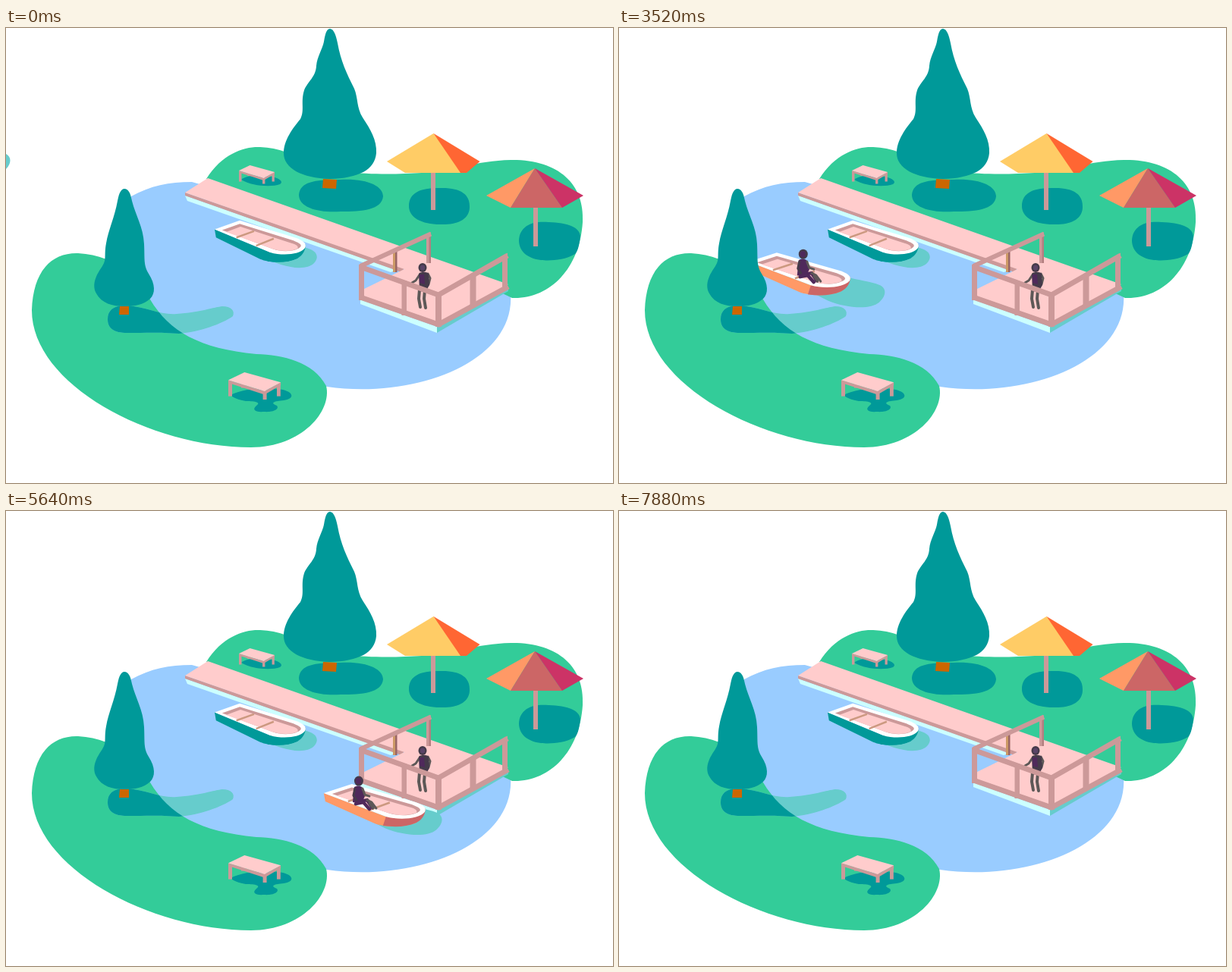
Recreate the animation shown at these times as an HTML page with a canvas. Size 800 by 600 pixels, loop 8 s.

```html
<!DOCTYPE html>
<html lang="en">
<head>
<meta charset="utf-8">
<title>Lake with boats</title>
<style>
html, body { margin: 0; width: 100%; height: 100%; overflow: hidden; background: #fff; }
canvas { display: block; }
</style>
</head>
<body>
<canvas id="stage" width="800" height="600"></canvas>
<script>
const ctx = document.getElementById('stage').getContext('2d');
const LOOP = 8000, STEP = 40;
const C = {
  water: '#99ccff', grass: '#33cc99', leaf: '#009999', shade: '#66cccc', foam: '#ccffff',
  wood: '#ffcccc', beam: '#cc9999', trunk: '#cc6600', skin: '#453a4a', cloth: '#4f295b', limb: '#5d5857'
};

const fill = (d, color) => { ctx.fillStyle = color; ctx.fill(new Path2D(d)); };
const line = (d, color, width, cap = 'butt') => {
  ctx.strokeStyle = color;
  ctx.lineWidth = width;
  ctx.lineCap = cap;
  ctx.lineJoin = cap === 'round' ? 'round' : 'miter';
  ctx.stroke(new Path2D(d));
};
const rect = (x, y, w, h, color) => { ctx.fillStyle = color; ctx.fillRect(x, y, w, h); };
const dot = (x, y, rx, ry, color) => {
  ctx.fillStyle = color;
  ctx.beginPath();
  ctx.ellipse(x, y, rx, ry, 0, 0, Math.PI * 2);
  ctx.fill();
};
const at = ([x, y], draw, sx = 1, sy = 1) => {
  ctx.save();
  ctx.translate(x, y);
  ctx.scale(sx, sy);
  draw();
  ctx.restore();
};

// Each track: time, x, y with straight travel between keys.
const tracks = {
  boat: [[0, -174, 134.6], [3960, 214, 330], [5960, 457.8, 380], [8000, 825, 561.6]],
  rower: [[0, -103, 123.5], [3960, 286, 320], [5960, 499, 363], [8000, 882, 547]],
  shadow: [[0, 6, 174], [3960, 394, 369.5], [5960, 609.6, 413.5], [8000, 1005, 600]]
};
function place(track, t) {
  const i = Math.max(1, track.findIndex(k => t <= k[0]));
  const [t0, x0, y0] = track[i - 1], [t1, x1, y1] = track[i];
  const p = (t - t0) / (t1 - t0);
  return [x0 + (x1 - x0) * p, y0 + (y1 - y0) * p];
}

function water() {
  fill('M165 222C190 208 215 203 245 203L480 270L664 330L665 350C672 440 540 490 423 473L200 420L160 300Z', C.water);
}

function farShore() {
  fill('M264 199C285 165 315 156 335 157C360 158 378 166 400 178C440 194 500 194 548 191C590 188 620 175 665 174C727 173 763 205 760 256C756 318 716 358 667 356L560 305Z', C.grass);
  fill('M386 220C388 203 405 200 440 200C475 198 497 208 497 222C495 240 470 242 441 242C415 244 386 238 386 220Z', C.leaf);
  fill('M531 235C531 215 550 210 575 211C600 211 612 220 611 237C610 255 590 260 572 259C548 259 531 250 531 235Z', C.leaf);
  fill('M676 280C677 260 695 254 715 256C740 257 756 262 757 275C755 290 753 295 750 298C735 307 715 307 705 306C688 304 676 295 676 280Z', C.leaf);
  fill('M310 200C318 193 335 194 350 196C361 198 366 203 361 206C350 210 325 209 310 200Z', C.leaf);
}

function bench() {
  rect(11.5, 8, 3, 6, C.beam);
  rect(0, 8, 3.4, 13.5, C.beam);
  rect(31, 16, 3.4, 8.5, C.beam);
  rect(43.5, 9, 3.3, 12.5, C.beam);
  fill('M0 7L32.5 17L47 9V11.5L32.5 20L0 9.5Z', C.beam);
  fill('M0 7L14.5 0L47 9L32.5 17Z', C.wood);
}

function bigTree() {
  fill('M427 1C432 1 435 10 437 20C441 43 449 60 459 80C464 92 462 105 470 118C480 133 489 148 488 165C486 187 465 198 427 199C390 198 366 185 366 165C366 148 378 132 388 120C394 108 388 98 393 82C398 70 408 65 409 50C410 38 417 28 419 18C421 6 423 1 427 1Z', C.leaf);
  fill('M418 199L436 200L435 212L417 211Z', C.trunk);
}

function umbrellas() {
  rect(560, 188, 6, 52, C.beam);
  fill('M563.5 139L502 176L526 191H607Z', '#ffcc66');
  fill('M563.5 139L599 191H607L624.5 176Z', '#ff6633');
  rect(695, 235, 6, 53, C.beam);
  fill('M697 185L633 221L665 237Z', '#ff9966');
  fill('M697 185L665 237H733Z', '#cc6666');
  fill('M697 185L733 237L761 221Z', '#cc3366');
}

function standing() {
  line('M545 345L544 357L546 368M552 345L551 357L553 369', C.limb, 4, 'round');
  line('M546 324L540 333L535 336M556 324L559 330L557 338', C.limb, 3, 'round');
  fill('M544 324C548 321 554 321 557 324L558 339L553 348L545 347Z', C.skin);
  fill('M545 325H551L552 338L545 336Z', C.cloth);
  dot(549, 316, 5.5, 6, C.skin);
  dot(549, 316, 3, 3.5, '#5a4468');
}

function dock() {
  fill('M236 221L516 319L507 322L239 228Z', C.foam);
  fill('M236 217L525 317L521 322L236 221Z', C.beam);
  fill('M467 358L568 394V402L467 364Z', C.foam);
  fill('M568 394L662 340V347L568 402Z', C.shade);
  fill('M236 217L266 198L662 338L568 390L468 354V346L525 318Z', C.wood);
  // back rail
  rect(510, 294, 5, 28, '#cc9966');
  rect(513, 294, 2.5, 28, '#996666');
  fill('M554 273L560 269V310H554Z', C.beam);
  rect(557.5, 275, 2.5, 35, '#b37f80');
  line('M467 314L560 271.5', C.beam, 6);
  standing();
  // front rails
  line('M467 355L570 391L662 341M467 315L570 352L661 300', C.beam, 7);
  rect(465, 312, 7, 47, C.beam);
  rect(521.5, 333, 6.5, 46, C.beam);
  rect(566, 350, 8, 44, C.beam);
  rect(611.5, 325, 8, 40, C.beam);
  fill('M654 301L661 296.5V343L654 347Z', C.beam);
}

function boat(side, bow) {
  fill('M0 0L2 11L67 40C80 45 105 46 122 39L134 20L82 31Z', side);
  fill('M82 31C100 36 128 33 134 20C134 28 130 35 122 39C108 45 93 45 78 43Z', bow);
  fill('M0 0L37 -12L121 12C132 16 136 20 133 25C126 34 100 36 82 31Z', '#fff');
  fill('M11 1L37 -7.5L116 15C126 19 129 21 126 24C118 30 100 31 86 26.5Z', C.beam);
  fill('M17 3.5L38 -3.5L113 18.5C121 20.5 124 23 122 26C113 30 99 30 86 26.5Z', C.wood);
  line('M32 11L58 2.5M61 22L87 12.5', '#cc9980', 2.5);
}

function greenBoat() {
  fill('M335 300C365 317 395 321 406 310C413 302 411 293 392 289Z', C.shade);
  at([275, 265.5], () => boat(C.leaf, C.leaf), 0.895, 0.98);
}

function rower() {
  line('M-3 28L11 25L18 35M-4 30L6 28L14 37', C.cloth, 4.5, 'round');
  line('M11 25L17 28L23 36M14 29L19 36', C.limb, 3, 'round');
  fill('M-6 8C-2 5 4 6 6 10L8 20L4 30L-8 28Z', C.cloth);
  line('M-5 10L-7 19L-3 25', C.skin, 3, 'round');
  line('M5 10L8 18L14 20', C.limb, 3, 'round');
  dot(0, 0, 6, 6.5, C.skin);
  dot(-0.5, 0, 3.5, 4, C.cloth);
}

function traveller(t) {
  at(place(tracks.shadow, t), () =>
    fill('M-140 -20L-75 12C-50 22 -20 24 -8 14C2 5 2 -5 -8 -9C-20 -14 -35 -15 -50 -19Z', C.shade));
  at(place(tracks.boat, t), () => boat('#ff9966', '#cc6666'));
  at(place(tracks.rower, t), rower);
}

const nearLand = 'M34 372C36 320 60 296 95 297C150 300 175 335 190 358C215 400 255 423 330 430C365 431 405 440 422 472C430 505 390 553 323 553C190 553 34 470 34 372Z';
const treeShade = 'M134 384C134 372 142 365 160 366C185 368 205 379 225 377C255 375 275 368 285 367C297 367 302 373 299 380C285 390 255 401 228 403C200 401 185 402 160 402C142 402 134 396 134 384Z';

function nearShore() {
  fill(nearLand, C.grass);
  fill(treeShade, C.shade);
  ctx.save();
  ctx.clip(new Path2D(nearLand));
  fill(treeShade, C.leaf);
  ctx.restore();
  fill('M156 212C161 212 164 217 166 228C171 248 181 262 182 285C183 305 181 312 188 324C197 338 197 350 190 357C181 365 170 367 156 367C140 367 126 363 119 350C112 338 120 324 127 314C133 305 129 300 132 284C135 266 143 250 147 228C149 217 152 212 156 212Z', C.leaf);
  fill('M150 367H162V378L149 378Z', C.trunk);
  fill('M296 484C315 475 340 473 365 477C380 481 380 489 366 491C354 492 347 494 357 498C361 503 351 507 340 506C328 507 324 503 330 498C336 494 330 492 316 492C306 490 300 488 296 484Z', C.leaf);
  at([293, 454], bench, 1.47, 1.47);
}

function frame() {
  const t = Math.floor(performance.now() % LOOP / STEP) * STEP;
  rect(0, 0, 800, 600, '#fff');
  water();
  farShore();
  at([307, 181], bench);
  bigTree();
  umbrellas();
  dock();
  greenBoat();
  traveller(t);
  nearShore();
  requestAnimationFrame(frame);
}
frame();
</script>
</body>
</html>
```
